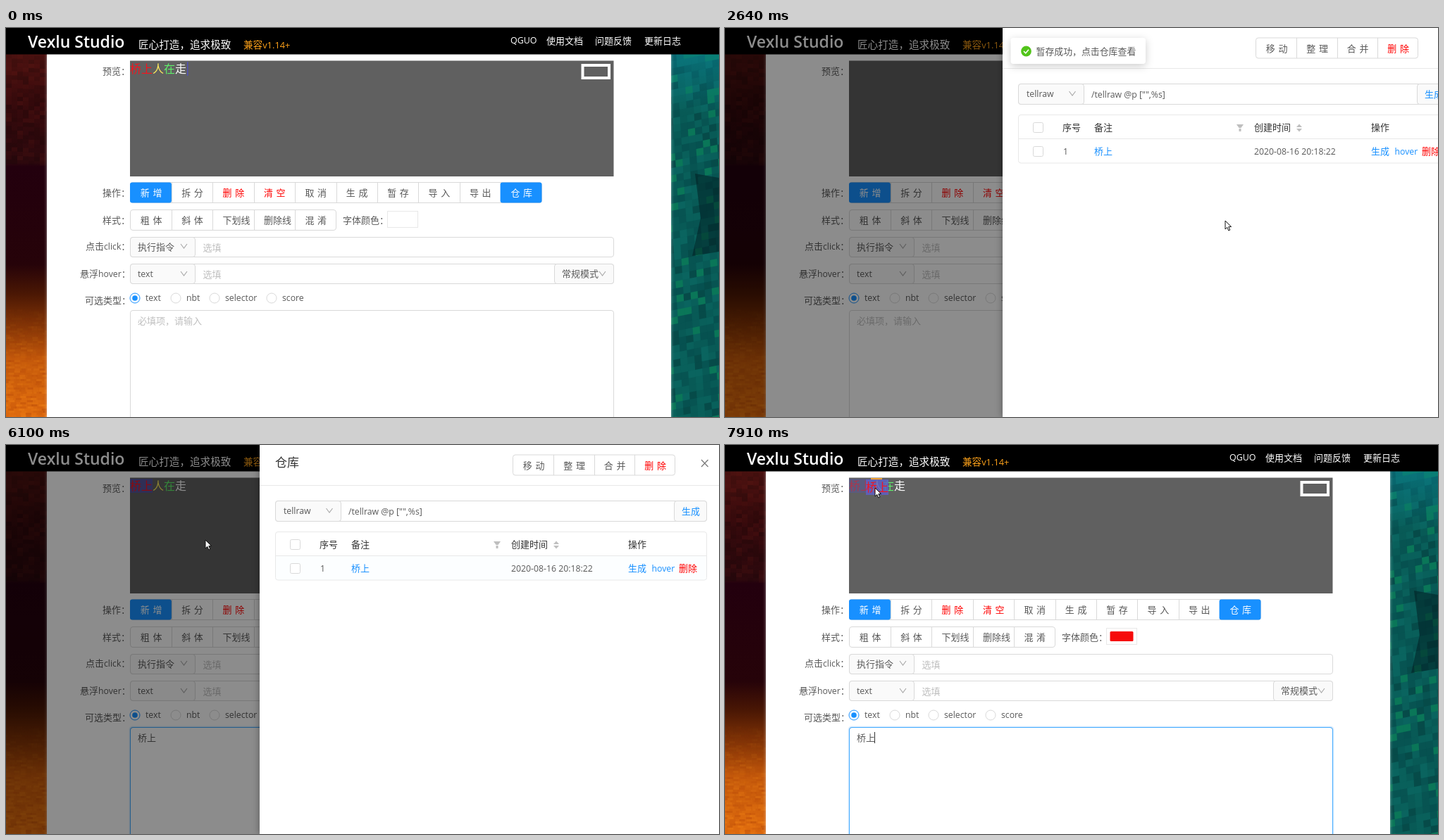
Recreate the animation shown at these times as an HTML page with a canvas. Size 1012x553 px, loop 8000 ms.

```html
<!DOCTYPE html>
<html lang="zh-CN">
<head>
<meta charset="utf-8">
<style>
html, body { margin: 0; width: 100%; height: 100%; overflow: hidden; background: #000; }
canvas, svg { position: absolute; left: 0; top: 0; width: 1012px; height: 553px; }
svg { overflow: hidden; }
text { font: 300 13px 'Open Sans', 'Noto Sans CJK SC', 'Noto Sans CJK', sans-serif; fill: #595959; white-space: pre; }
tspan.latin { font-size: .945em; font-weight: 400; }
.box { fill: #fff; stroke: #d9d9d9; }
.tint { fill: #fafafa; stroke: #d9d9d9; }
.line { fill: none; stroke: #d9d9d9; }
.soft { fill: none; stroke: #e8e8e8; }
.blue { fill: none; stroke: #40a9ff; }
.chevron { fill: none; stroke: #a8a8a8; stroke-width: 1.1; }
</style>
</head>
<body>
<canvas id="scenery" width="1012" height="553"></canvas>
<svg id="stage" viewBox="0 0 1012 553"></svg>
<script>
const BLUE = '#1890ff', RED = '#f5141e', PALE = '#bfbfbf', DARK = '#333';
const $ = id => document.getElementById(id);

// Scenery behind the page
let seed = 11;
const rnd = () => (seed = seed * 16807 % 2147483647) / 2147483647;
const pick = list => list[Math.floor(rnd() * list.length)];

function paintScenery() {
  const c = $('scenery').getContext('2d');
  const fill = (color, x, y, w, h) => { c.fillStyle = color; c.fillRect(x, y, w, h); };
  const left = c.createLinearGradient(0, 37, 0, 553);
  [[0, '#4d1210'], [.13, '#380a0c'], [.3, '#2c080d'], [.31, '#23000e'], [.58, '#260309'],
   [.66, '#4a1704'], [.76, '#8a3806'], [.84, '#c4590b'], [1, '#e06c0e']].forEach(s => left.addColorStop(...s));
  fill(left, 0, 37, 58, 516);
  for (let y = 37; y < 192; y += 6)
    for (let x = 0; x < 58; x += 8)
      fill(`rgba(${pick(['0,0,0', '0,0,0', '110,30,24'])},${rnd() * .18})`, x, y + x * .06, 8, 6);
  for (let y = 400; y < 553; y += 3)
    for (let x = -6; x < 58; x += 8)
      fill(`rgba(${pick(['255,150,30', '150,45,0'])},${rnd() * (y - 380) / 700})`, x + rnd() * 6, y, 8, 3);

  c.save();
  c.beginPath();
  c.rect(944, 37, 68, 516);
  c.clip();
  fill('#085855', 944, 37, 68, 516);
  c.setTransform(1, -.2, .06, 1, 930, 20);
  const teal = ['#075452', '#095f5a', '#064b49', '#0a645f', '#085a56', '#065150', '#09605b', '#0a7658'];
  for (let y = 0; y < 590; y += 10)
    for (let x = -30; x < 90; x += 10) fill(pick(teal), x, y, 11, 11);
  c.setTransform(1, 0, 0, 1, 0, 0);
  const glow = c.createLinearGradient(0, 37, 0, 120);
  glow.addColorStop(0, 'rgba(10,140,165,.4)');
  glow.addColorStop(1, 'rgba(10,140,165,0)');
  fill(glow, 944, 37, 68, 83);
  c.fillStyle = 'rgba(0,26,30,.5)';
  c.beginPath();
  [[978, 207], [1012, 213], [1012, 318], [974, 324], [986, 270]].forEach(p => c.lineTo(...p));
  c.fill();
  c.restore();
}

// Markup helpers
const rect = (x, y, w, h, cls, more = '') =>
  `<rect x="${x}" y="${y}" width="${w}" height="${h}" class="${cls}" ${more}/>`;
const path = (d, cls, more = '') => `<path d="${d}" class="${cls}" ${more}/>`;
const text = (x, y, str, style = '') => `<text x="${x}" y="${y}" style="${style}">` +
  str.replace(/[\x20-\x7e]+/g, run => `<tspan class="latin">${run}</tspan>`) + '</text>';
const group = (id, ...parts) => `<g id="${id}">${parts.join('')}</g>`;
const chevron = (x, y) => path(`M${x - 4.5} ${y - 3}l4.5 6 4.5-6`, 'chevron');
const rounded = 'rx="3.5"';

function buttons(x, y, step, labels, colors = {}) {
  const frame = rect(x, y, step * labels.length, 29, 'box', rounded);
  return frame + labels.map((label, i) => {
    const left = x + step * i, color = colors[i];
    const solid = color === '#fff' ? rect(left - .5, y, step + .5, 29, '', `rx="3" fill="${BLUE}"`) : '';
    const rule = i ? path(`M${Math.round(left) + .5} ${y}v29`, 'line') : '';
    const spacing = label.length === 2 ? 'letter-spacing:4.6px;' : '';
    return rule + solid + text(left + 14.3, y + 19.5, label, spacing + (color ? `fill:${color};font-weight:400` : ''));
  }).join('');
}

function radio(x, label, on) {
  const ring = `<circle cx="${x}" cy="384" r="7" fill="#fff" stroke="${on ? BLUE : '#d9d9d9'}"/>`;
  const dot = on ? `<circle cx="${x}" cy="384" r="3.8" fill="${BLUE}"/>` : '';
  return ring + dot + text(x + 15, 388, label);
}

const verseRed = (x, y) => text(x, y, '桥上', `font-size:16px;fill:${RED}`);
const verseRest = (x, y) => [['人', '#ffec5c'], ['在', '#5ff06a'], ['走', '#fff']].map(([ch, color], i) =>
  text(x + 32 + 16 * i, y, ch, `font-size:16px;fill:${color}`)).join('');

const header = [
  rect(0, 0, 1012, 37.5, '', 'fill="#000"'),
  `<text x="31" y="28" style="font-size:23px;font-weight:600;fill:#fff">Vexlu Studio</text>`,
  text(188, 28.5, '匠心打造，追求极致', 'font-size:14.6px;font-weight:400;fill:#fff'),
  text(337, 28.5, '兼容v1.14+', 'font-size:13.6px;font-weight:400;fill:#ffa31a'),
  text(716, 22, 'QGUO', 'font-size:13.2px;font-weight:600;fill:#fff'),
  ...[[767, '使用文档'], [836, '问题反馈'], [906, '更新日志']].map(([x, s]) =>
    text(x, 22.5, s, 'font-weight:500;fill:#fff')),
].join('');

const labels = [[137, 66, '预览'], [137, 239, '操作'], [137, 278, '样式'], [113, 315, '点击click'],
  [105, 354, '悬浮hover'], [112, 392, '可选类型'], [478, 278, '字体颜色']]
  .map(([x, y, s]) => text(x, y, s + '：')).join('');

const preview = [
  rect(176, 46.5, 686.5, 164.5, '', 'fill="#606060"'),
  rect(818.5, 53, 37.5, 18, '', 'fill="#606060" stroke="#fff" stroke-width="4"'),
  group('select', rect(176, 48, 32, 20, '', 'fill="#5353b0" opacity=".75"')),
  group('red', verseRed(176, 64)),
  group('rest', verseRest(176, 64)),
  group('caretEnd', rect(257, 48, 1.5, 20, '', 'fill="#5050b8"')),
  group('caretStart', rect(176, 47, 2, 21, '', 'fill="#5050b8"')),
  group('ghost', rect(207, 47, 16, 2.5, '', 'fill="#f0a030"'),
    group('ghostBody', rect(0, 49, 32, 22, '', 'fill="#6060c4" opacity=".85"'), verseRed(0, 66))),
].join('');

const form = [
  buttons(176.5, 219.5, 58.4, ['新增', '拆分', '删除', '清空', '取消', '生成', '暂存', '导入', '导出', '仓库'],
    { 0: '#fff', 2: '#f00', 3: '#f00', 9: '#fff' }),
  group('saveHover', rect(526.5, 219.5, 58, 29, 'blue'), text(541.2, 239, '暂存', `letter-spacing:4.6px;fill:#40a9ff`)),
  group('exportHover', rect(643.5, 219.5, 58, 29, 'blue'), text(658, 239, '导出', `letter-spacing:4.6px;fill:#40a9ff`)),
  group('storeHover', rect(701.6, 219.5, 58.9, 29, '', 'rx="3" fill="#40a9ff"'),
    text(716.4, 239, '仓库', 'letter-spacing:4.6px;font-weight:400;fill:#fff')),
  buttons(176.5, 258.5, 58.4, ['粗体', '斜体', '下划线', '删除线', '混淆']),
  rect(541.5, 260.5, 43, 23, 'soft'),
  rect(176.5, 297.5, 686, 28, 'box', rounded),
  rect(176.5, 297.5, 92, 28, 'tint', rounded),
  text(187, 316, '执行指令'), chevron(252.5, 310), text(279.5, 317, '选填', `fill:${PALE}`),
  group('clickHover', rect(268.5, 297.5, 594, 28, 'blue')),
  rect(176.5, 335.5, 686, 28, 'box', rounded),
  rect(176.5, 335.5, 92, 28, 'tint', rounded),
  rect(778.5, 335.5, 84, 28, 'tint', rounded),
  text(187, 354, 'text'), chevron(252.5, 349), text(279.5, 355, '选填', `fill:${PALE}`),
  text(789, 354, '常规模式'), chevron(846.5, 349),
  radio(183, 'text', true), radio(241, 'nbt'), radio(296, 'selector'), radio(377, 'score'),
  rect(176.5, 401.5, 686, 170, 'box', rounded),
  group('placeholder', text(187, 421, '必填项，请输入', `fill:${PALE}`)),
  group('focus', rect(175.5, 400.5, 688, 172, '', 'rx="4" fill="none" stroke="#1890ff" stroke-opacity=".14" stroke-width="2"'),
    rect(176.5, 401.5, 686, 170, 'blue', rounded)),
  group('filled', text(187, 421, '桥上'), rect(546.5, 265, 33, 14, '', 'rx="1.5" fill="#f60b0b"')),
  group('caret', rect(212, 408, 1, 16, '', 'fill="#333"')),
].join('');

const strong = `fill:${DARK};font-weight:400`, link = `fill:${BLUE}`;
const drawer = group('drawer',
  rect(360, 0, 660, 553, '', 'fill="#fff" style="filter:drop-shadow(-2px 0 4px #0004)"'),
  text(382, 31, '仓库', `font-size:17px;${strong}`),
  buttons(719.5, 14, 57.5, ['移动', '整理', '合并', '删除'], { 3: '#f00' }),
  path('M987 21l9.5 10m0-10l-9.5 10', '', 'stroke="#777" stroke-width="1.2"'),
  path('M360 57.5h660', 'soft'),
  rect(382.5, 79.5, 612, 29, 'box', rounded),
  rect(382.5, 79.5, 93, 29, 'tint', rounded),
  rect(948.5, 79.5, 46, 29, 'tint', rounded),
  text(394, 98, 'tellraw'), chevron(459, 93),
  text(486, 99, '/tellraw @p ["",%s]'), text(959, 99, '生成', link),
  rect(382.5, 123.5, 612, 68.5, 'soft', rounded),
  group('rowHover', rect(383, 158, 611.5, 34, '', 'fill="#e6f7ff"')),
  path('M382 157.5h613', 'soft'),
  rect(403.5, 134.5, 14, 14, 'box', 'rx="2"'), rect(403.5, 168.5, 14, 14, 'box', 'rx="2"'),
  ...[[445, '序号'], [490, '备注'], [717, '创建时间'], [883, '操作']].map(([x, s]) => text(x, 146, s, strong)),
  path('M692 137h10l-3.5 5h-3zM695.500 143h3v4h-3zM777 141l4-4.500 4 4.500zM777 143l4 4.500 4-4.500z', '', `fill="${PALE}"`),
  text(446, 180, '1'), text(490, 180, '桥上', link), text(717, 180, '2020-08-16 20:18:22'),
  text(883, 180, '生成', link), text(916.5, 180, 'hover', link), text(955, 180, '删除', 'fill:#f00'),
  group('tip', rect(455, 113, 97, 42, '', 'rx="4" fill="#000" fill-opacity=".76"'),
    path('M499 155h9l-4.500 4z', '', 'fill="#000" fill-opacity=".76"'), verseRed(463, 137), verseRest(463, 137)));

const toast = group('toast',
  rect(405.5, 14, 191.5, 37, '', 'rx="4" fill="#fff" style="filter:drop-shadow(0 3px 6px #0003)"'),
  '<circle cx="427.500" cy="33" r="7.400" fill="#52c41a"/>',
  path('M424 33l2.700 2.800 4.300-5', '', 'fill="none" stroke="#fff" stroke-width="1.500"'),
  text(441.5, 38, '暂存成功，点击仓库查看', 'font-size:12.9px'));

const cursors = {
  arrow: 'M0 0v12l2.800-2.600 2 4.600 2-.9-2-4.500h3.800z',
  hand: 'M-1.500 1.200q1.500-2.400 3 0v5l4.800 1.200q1.900.5 1.700 2.600l-1 6h-7l-4-5.500q-1-2.300 1-2l1.500 1.500z',
  beam: 'M-2-7h4M0-7v14M-2 7h4',
};

paintScenery();
$('stage').innerHTML = rect(58, 37, 886, 530, '', 'fill="#fff" style="filter:drop-shadow(0 0 2px #fff8)"') +
  header + labels + preview + form + group('mask', rect(0, 0, 1012, 553, '', 'fill="#000"')) +
  drawer + toast + path('', '', 'id="cursor" fill="#fff" stroke="#111"');

// Each step lists what changes; plain numbers are opacities.
const steps = [
  [0, { red: 1, rest: 1, caretEnd: 1, caretStart: 0, select: 0, ghost: 0, saveHover: 0, exportHover: 0,
    storeHover: 0, clickHover: 0, placeholder: 1, focus: 0, filled: 0, caret: 0, mask: 0, rowHover: 0,
    tip: 0, toast: 0, slide: 680, cursor: null }],
  [200, { cursor: ['beam', 592, 314], clickHover: 1 }],
  [400, { cursor: ['arrow', 574, 274], clickHover: 0, caretEnd: 0 }],
  [610, { cursor: ['hand', 560, 234], saveHover: 1 }],
  [810, { cursor: ['hand', 557, 232], caretEnd: 1 }],
  [1020, { red: 0, rest: 0, caretEnd: 0, toast: .5 }],
  [1230, { toast: 1 }],
  [1430, { cursor: ['hand', 586, 233] }],
  [1630, { cursor: ['hand', 664, 230], exportHover: 1 }],
  [1830, { cursor: ['hand', 713, 228], exportHover: .7 }],
  [2030, { cursor: ['hand', 719, 230], exportHover: 0, storeHover: 1 }],
  [2230, { cursor: ['hand', 720, 231] }],
  [2430, { cursor: ['arrow', 717, 244], mask: .2, slide: 480 }],
  [2640, { cursor: ['arrow', 710, 274], mask: .45, slide: 34, storeHover: 0, saveHover: 0 }],
  [2840, { cursor: ['arrow', 694, 276], slide: 0 }],
  [3040, { cursor: ['arrow', 650, 262], caretStart: 1 }],
  [3240, { cursor: ['arrow', 604, 240] }],
  [3450, { cursor: ['arrow', 562, 216], caretStart: 0 }],
  [3650, { cursor: ['arrow', 535, 200] }],
  [3860, { cursor: ['arrow', 520, 188], rowHover: 1, toast: .9 }],
  [4060, { cursor: ['hand', 511, 181], toast: 0, caretStart: 1 }],
  [4270, { cursor: ['hand', 508, 180], tip: .6 }],
  [4480, { tip: 1, caretStart: 0 }],
  [5090, { caretStart: 1 }],
  [5490, { caretStart: 0, red: 1, rest: 1, select: 1, filled: 1, placeholder: 0, focus: 1 }],
  [5690, { cursor: ['hand', 500, 179] }],
  [5890, { cursor: ['arrow', 392, 160], tip: 0, rowHover: .6 }],
  [6100, { cursor: ['arrow', 283, 135], rowHover: .15 }],
  [6300, { cursor: ['arrow', 244, 103], rowHover: 0, slide: 330, mask: .25 }],
  [6500, { cursor: ['arrow', 193, 62], slide: 680, mask: 0, caret: 1 }],
  [6700, { cursor: ['arrow', 190, 60] }],
  [6910, { cursor: ['arrow', 189, 59], caret: 0 }],
  [7110, { cursor: ['arrow', 191, 60], ghost: 1, red: .5, select: .5 }],
  [7300, { cursor: ['arrow', 197, 61], caret: 1 }],
  [7510, { cursor: ['arrow', 204, 62] }],
  [7710, { cursor: ['arrow', 210, 62] }],
  [7910, { cursor: ['arrow', 213, 61] }],
];
const states = [];
steps.forEach(([, change], i) => states.push({ ...states[i - 1], ...change }));

function apply({ cursor, slide, ...opacities }) {
  for (const id in opacities) $(id).style.opacity = opacities[id];
  $('drawer').setAttribute('transform', `translate(${slide})`);
  $('toast').setAttribute('transform', `translate(0 ${(opacities.toast - 1) * 15})`);
  $('cursor').style.display = cursor ? '' : 'none';
  if (!cursor) return;
  const [shape, x, y] = cursor;
  $('cursor').setAttribute('d', cursors[shape]);
  $('cursor').setAttribute('transform', `translate(${x} ${y})`);
  $('ghostBody').setAttribute('transform', `translate(${x - 13} ${y - 61})`);
}

let shown = -1;
function tick() {
  const t = performance.now() % 8000;
  const now = steps.findLastIndex(([start]) => start <= t);
  if (now !== shown) apply(states[shown = now]);
  requestAnimationFrame(tick);
}
tick();
</script>
</body>
</html>
```
